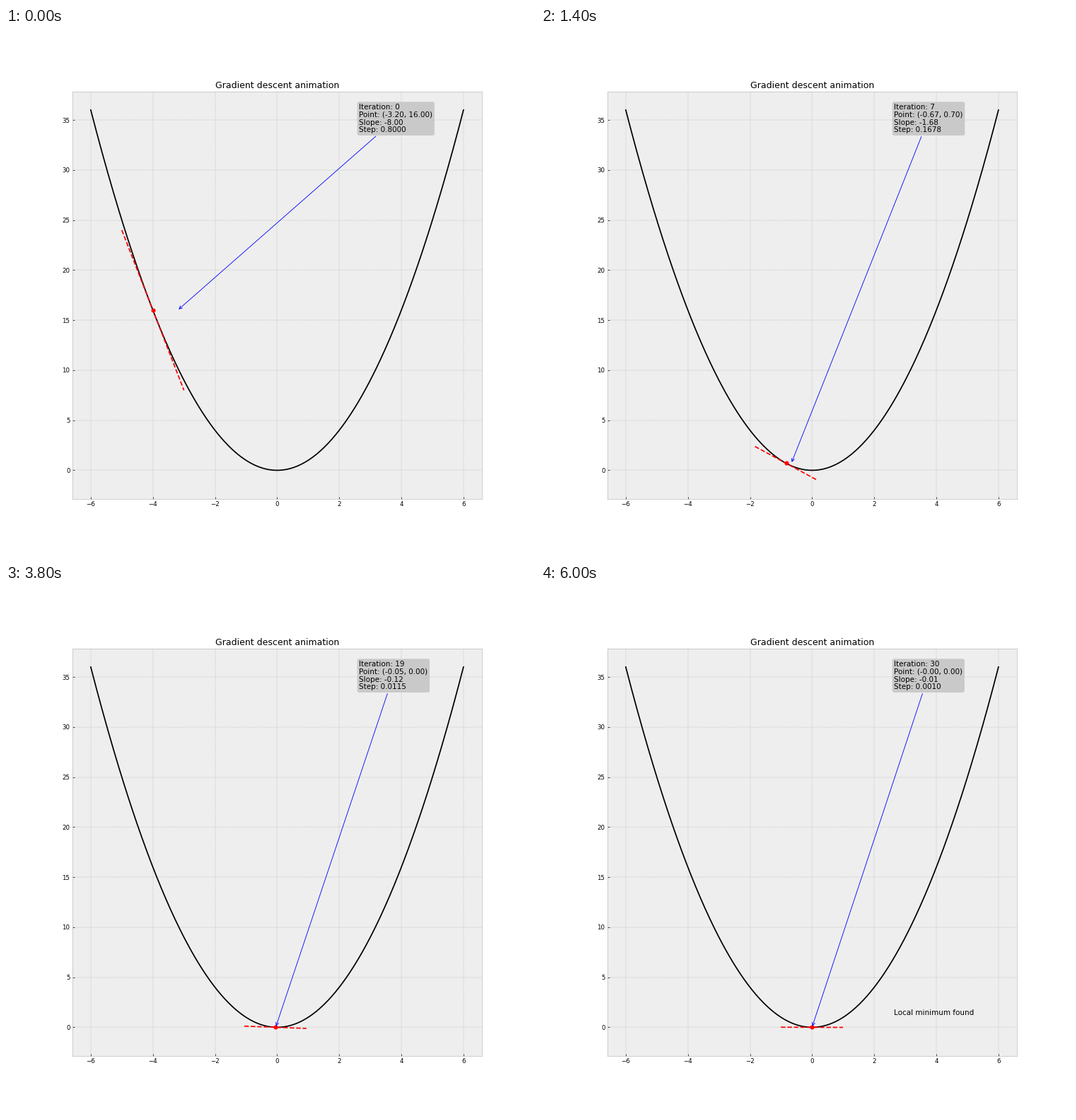
These frames come from a looping animation (748 by 748 pixels, 6200 ms). A matplotlib script:

```python
import numpy as np
import matplotlib.pyplot as plt
from matplotlib.animation import FuncAnimation

SIZE = 748
INCHES = 12
STEPS = 31
START = -4.0
RATE = 0.1
TOLERANCE = 0.001

plt.style.use("bmh")
plt.rcParams.update({
    "font.family": "DejaVu Sans",
    "font.size": 10,
    "savefig.dpi": "figure",
})


def f(x):
    return x ** 2


def slope_at(x):
    return 2 * x


fig, ax = plt.subplots(figsize=(INCHES, INCHES), dpi=SIZE / INCHES)
fig.set_facecolor("white")

xs = np.linspace(-6, 6, 400)
ax.plot(xs, f(xs), color="black", lw=2)
tangent, = ax.plot([], [], "--", color="red", lw=2)
dot, = ax.plot([], [], "o", color="red", ms=6)

# 5 % margins around the curve and the lowest tangent end
ax.set_xlim(-6.6, 6.6)
ax.set_ylim(-2.8475, 37.85)
ax.set_title("Gradient descent animation")

note = ax.annotate(
    "", xy=(START, f(START)), xytext=(0.7, 0.9), textcoords="axes fraction",
    size=12, linespacing=1.1,
    bbox=dict(boxstyle="round,pad=0.25", fc="#c9c9c9", ec="none"),
    arrowprops=dict(arrowstyle="->", color="blue", lw=1),
)
found = ax.text(0.7, 0.1, "Local minimum found", size=12,
                transform=ax.transAxes, visible=False)


def update(i):
    x = START * (1 - 2 * RATE) ** i
    y = f(x)
    slope = slope_at(x)
    step = -RATE * slope
    new_x = x + step

    ends = np.array([x - 1, x + 1])
    tangent.set_data(ends, y + slope * (ends - x))
    dot.set_data([x], [y])

    note.xy = (new_x, y)
    note.set_text(
        f"Iteration: {i}\n"
        f"Point: ({new_x:.2f}, {y:.2f})\n"
        f"Slope: {slope:.2f}\n"
        f"Step: {step:.4f}"
    )
    found.set_visible(bool(abs(step) < TOLERANCE))
    return tangent, dot, note, found


anim = FuncAnimation(fig, update, frames=STEPS, interval=200,
                     repeat=True, repeat_delay=0, blit=False)
plt.show()
```
